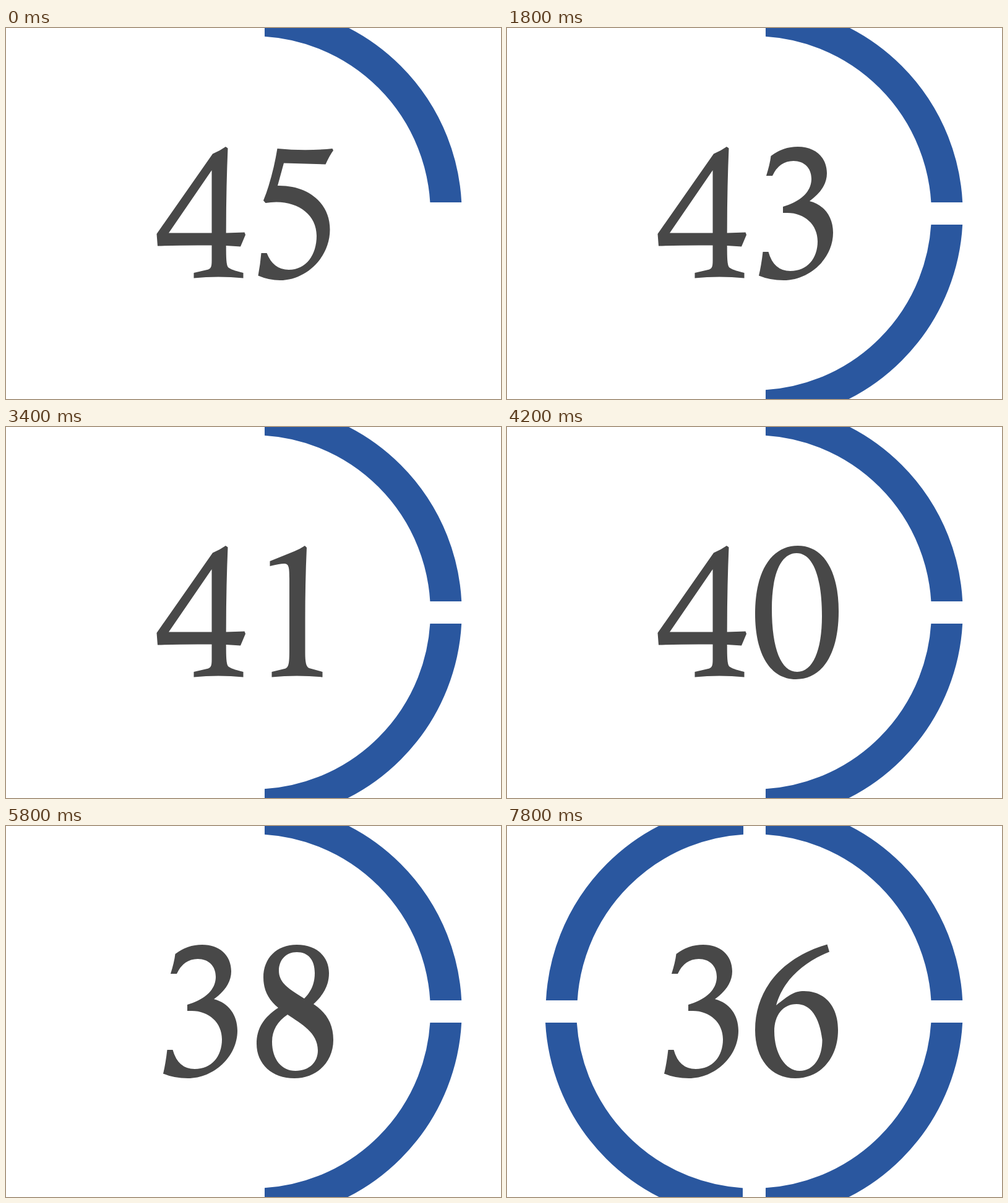
Write an HTML page that moves like this. It is 800 px wide and 600 px high and loops after 8 s.

```html
<!DOCTYPE html>
<html lang="en">
<head>
<meta charset="utf-8">
<title>Countdown</title>
<style>
  html, body { margin: 0; width: 100%; height: 100%; overflow: hidden; background: #fff; }
  svg { display: block; }
  #ring circle { fill: none; stroke: #2a579f; stroke-width: 50.7; }
  #number { fill: #484848; }
</style>
</head>
<body>
<svg id="stage" width="800" height="600" viewBox="0 0 800 600" role="img">
  <defs>
    <path id="d0" d="M470 192C511 192 536 232 536 298C536 368 509 408 467 408C426 408 401 368 401 302C401 232 428 192 470 192Z
      M468 204C443 204 428 237 428 294C428 359 443 396 469 396C494 396 509 362 509 306C509 241 494 204 468 204Z"/>
    <path id="d1" d="M483 192L486 195Q483.500 250 483.500 310V365C483.500 380 485 388 490 390L511.500 396V404.500
      Q470 400.500 429.500 404.500V396L450 391C457 389.500 458 383 458 360V245C458 226 457 221 449 221
      Q443 221 426.500 225V217L466 201Q474 198 483 192Z"/>
    <path id="d2" d="M413 246Q418 225 419 210Q440 192 467 192C498 192 517 212 517 242C517 276 495 310 443 381
      Q490 382 531 378Q528 390 528 404Q467 401 405 404V396C465 325 490 290 490 252C490 230 478 216 459 216Q434 216 423 246Z"/>
    <path id="d3" d="M419 239Q425 220 426.500 207Q446 192 470 192C498 192 517 209 517 235C517 252 507 267 489 280
      C513 286 527 306 527 331C527 373 489 408 447 408Q425 408 407 400.500Q411 384 413.500 362H422.500Q431 393 458 393
      C485 393 502 373 502 345C502 318 481 299 453 299H446V289C477 280 492 263 492 244C492 226 480 215 463 215Q440 215 429 239Z"/>
    <path id="d4" d="M508 192L511.500 194.500Q508.700 260 508.700 331.500L538.500 330.500L540 334.500L532 353.500L508.700 352
      C508.700 372 509 383 512 387Q516 391 536.500 396V404.500Q496 400.500 456.500 404.500V396L478 391
      C484 389.500 485.500 387 485.500 376V351.500Q440 351 398 352.500L396.500 333L487 203.500Q498 199 508 192Z
      M485.500 230L416 331.500H485.500Z"/>
    <path id="d5" d="M438.500 195Q484 199.500 527.500 195L529 198Q523 206 516.500 220.500L449 218.500L439 255
      C487 254 523.500 282 523.500 326C523.500 372 484 408 443 408Q425 408 407.500 400.500Q411 382 412.500 364H421.500
      Q432 391 457 391C485 391 502 367 502 336C502 303 474 281.500 437 281.500Q428 281.500 419.500 283L416 279
      C427 252 434 222 438.500 195Z"/>
    <path id="d6" d="M517.500 191.500L521 203.500C478 221 446 250 435 290C455 274 464 267 480 267C514 267 535 292 535 330
      C535 376 506 408 466 408C426 408 401 376 401 330C401 262 447 212 517.500 191.500Z
      M468 288C446 288 432 306 432 332C432 368 450 396 473 396C496 396 509.500 374 509.500 346C505 308 490 288 468 288Z"/>
    <path id="d7" d="M428 195Q480 199 535 195V204C508 272 485 340 468.500 408Q454 406 443 408L440 405Q476 327 514.500 219
      L450 218C438 218 434 219 430 225Q424 232 420 242H409Q421 217 428 195Z"/>
    <path id="d8" d="M470 192C502 192 522 211 522 238C522 258 513 273 497 288C518 302 529 320 529 346C529 382 502 408 466 408
      C430 408 405 385 405 352C405 327 417 309 440 294C424 281 416 265 416 245C416 214 437 192 470 192Z
      M470 204C452 204 441 217 441 234C441 256 462 266 482 279C493 268 499 255 499 238C499 217 489 204 470 204Z
      M455 305C439 316 430 330 430 349C430 378 446 396 468 396C490 396 504 382 504 363C504 334 477 320 455 305Z"/>
    <path id="d9" d="M421.500 408.500L418.500 396.500C461 379 494 346 504.500 303C487 319 474 330 456 330
      C425 330 404 304 404 266C404 222 433 192 474 192C513 192 536.500 223 536.500 267C536.500 330 500 384 421.500 408.500Z
      M466 204C444 204 430 224 430 251C430 286 446 309 472 309C493 309 508.500 291 508.500 267C508.500 231 491 204 466 204Z"/>
  </defs>
  <!-- Each nested svg clips the ring to one quarter, clockwise from top right. -->
  <g id="ring">
    <svg x="418" y="0" width="382" height="282" viewBox="418 0 382 282"><circle cx="399.6" cy="299.6" r="311.7"/></svg>
    <svg x="418" y="318" width="382" height="282" viewBox="418 318 382 282"><circle cx="399.6" cy="299.6" r="311.7"/></svg>
    <svg x="0" y="318" width="381" height="282" viewBox="0 318 381 282"><circle cx="398.6" cy="299.6" r="311.7"/></svg>
    <svg x="0" y="0" width="382" height="282" viewBox="0 0 382 282"><circle cx="399.6" cy="299.6" r="311.7"/></svg>
  </g>
  <g id="number" fill-rule="evenodd">
    <use id="tens" x="-153"/>
    <use id="units"/>
  </g>
</svg>
<script>
  const STEP = 200, QUARTERS = 4, FIRST = 45, COUNT = 10;
  const byId = id => document.getElementById(id);
  const stage = byId('stage'), tens = byId('tens'), units = byId('units');
  const quarters = [...byId('ring').children];
  const start = performance.now();
  let shown = -1;

  function draw(step) {
    const value = FIRST - Math.floor(step / QUARTERS);
    tens.setAttribute('href', '#d' + Math.floor(value / 10));
    units.setAttribute('href', '#d' + value % 10);
    stage.setAttribute('aria-label', value);
    quarters.forEach((q, i) => q.style.display = i <= step % QUARTERS ? '' : 'none');
  }

  function tick() {
    const elapsed = performance.now() - start;
    const step = Math.floor(elapsed / STEP) % (COUNT * QUARTERS);
    if (step !== shown) draw(shown = step);
    requestAnimationFrame(tick);
  }
  tick();
</script>
</body>
</html>
```
